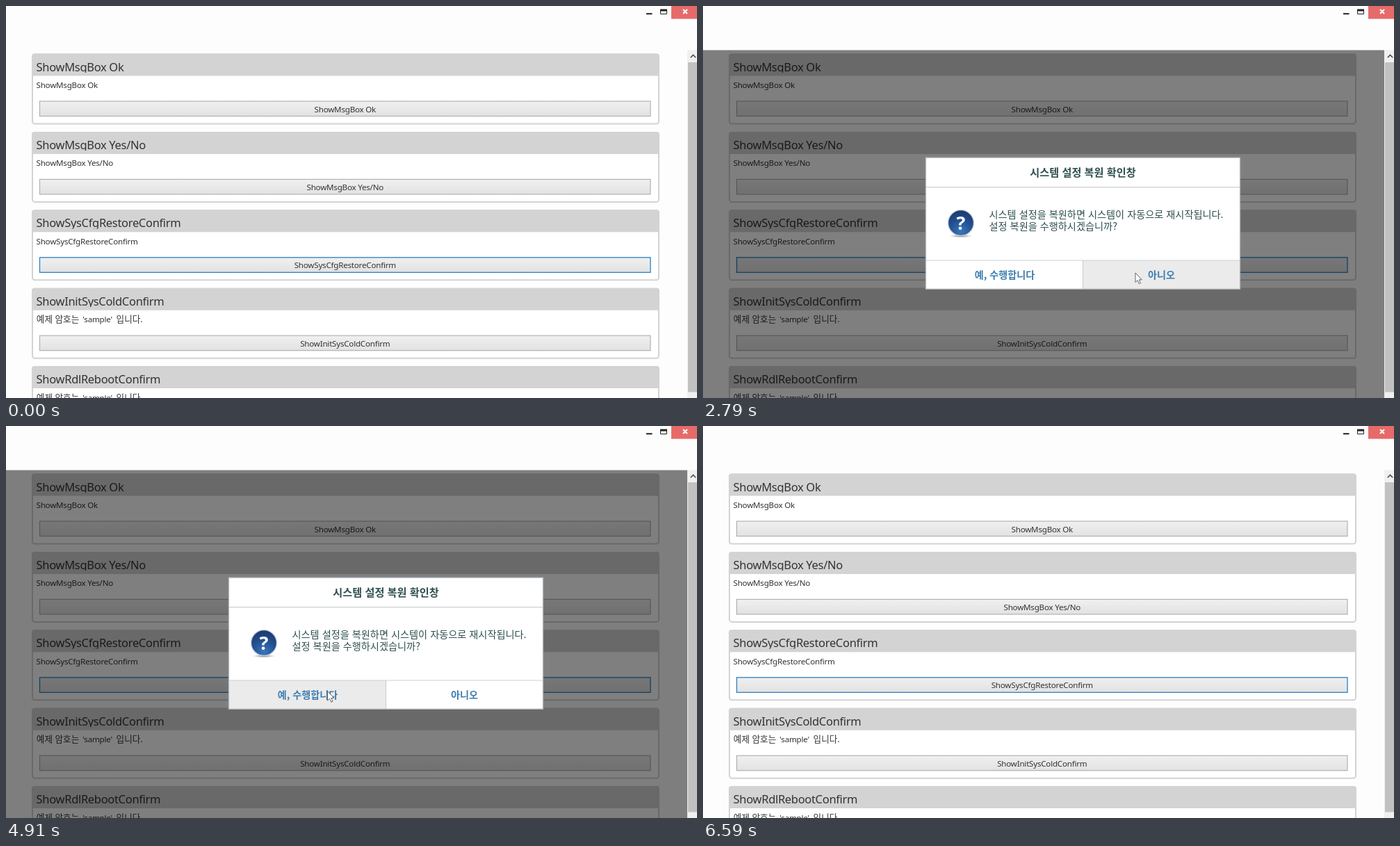
Recreate the animation shown at these times as an HTML page. Size 994 px wide and 564 px high, loop 7.57 s.

```html
<!DOCTYPE html>
<html lang="ko">
<head>
<meta charset="utf-8">
<style>
  html, body { margin: 0; width: 100%; height: 100%; overflow: hidden; background: #fdfdfd; }
  svg { display: block; width: 994px; height: 564px; }
  text { font-family: "Noto Sans", "Noto Sans CJK KR", "Noto Sans CJK JP", sans-serif; white-space: pre; }
  .title { font-size: 16.5px; letter-spacing: -0.32px; fill: #333; }
  .body { font-size: 11.6px; letter-spacing: -0.22px; fill: #333; }
  .ko { font-family: "Noto Sans CJK KR", "Noto Sans CJK JP", sans-serif; }
  .note { font-size: 12.6px; fill: #333; }
  .msg { font-size: 14.2px; fill: #2f4f4f; }
  .head { font-size: 15.2px; font-weight: 700; fill: #2f4f4f; text-anchor: middle; }
  .cmd { font-size: 14.1px; font-weight: 700; fill: #3d7daf; text-anchor: middle; }
  .mid { text-anchor: middle; }
</style>
</head>
<body>
<svg id="stage" viewBox="0 0 994 564">
  <defs>
    <linearGradient id="plain" x2="0" y2="1">
      <stop stop-color="#f0f0f0"/><stop offset="1" stop-color="#e2e2e2"/>
    </linearGradient>
    <linearGradient id="hot" x2="0" y2="1">
      <stop stop-color="#deeefc"/><stop offset="1" stop-color="#c0dff8"/>
    </linearGradient>
    <radialGradient id="ball" cx=".5" cy=".85" r=".85">
      <stop stop-color="#3a76b8"/><stop offset=".55" stop-color="#234f90"/><stop offset="1" stop-color="#1d3768"/>
    </radialGradient>
    <radialGradient id="shade">
      <stop stop-color="#555" stop-opacity=".75"/><stop offset="1" stop-color="#888" stop-opacity="0"/>
    </radialGradient>
    <linearGradient id="leaf" x2="0" y2="1">
      <stop stop-color="#069a0c"/><stop offset="1" stop-color="#08b80a"/>
    </linearGradient>
  </defs>

  <rect width="994" height="564" fill="#fdfdfd"/>
  <g id="cards"></g>
  <rect id="veil" y="63.5" width="980" height="501" fill="#000" opacity=".5"/>

  <g id="scrollbar">
    <rect x="980" y="63.5" width="14" height="501" fill="#f0f0f0"/>
    <rect x="981" y="81" width="13" height="474.5" fill="#c1c1c1"/>
    <path d="M984.8 74.2 988.5 70.4 992.2 74.2" fill="none" stroke="#505050" stroke-width="1.6"/>
  </g>

  <g id="caption">
    <path d="M921 10.2h8.5v2h-8.5z" fill="#222"/>
    <path d="M941.5 5.5h9v6h-9z" fill="none" stroke="#222"/>
    <path d="M941 4.5h10v3h-10z" fill="#222"/>
    <rect x="957" width="37" height="18.5" fill="#e76a6a"/>
    <path d="M974 5l6 6M980 5l-6 6" stroke="#fff" stroke-width="2"/>
  </g>

  <g id="ask">
    <rect x="320.5" y="218.2" width="452" height="189" fill="#fff"/>
    <rect id="yes" x="321" y="366" width="225.5" height="41" fill="#ebebeb"/>
    <rect id="no" x="546.5" y="366" width="225.5" height="41" fill="#ebebeb"/>
    <path d="M321 260.7h451M321 366h451M546.5 366v41" stroke="#cdd0d2" stroke-width="1.2"/>
    <rect x="320.5" y="218.2" width="452" height="189" fill="none" stroke="#b3bac0" stroke-width="1.3"/>
    <text class="ko head" x="546.5" y="245.3">시스템 설정 복원 확인창</text>
    <ellipse cx="371" cy="331" rx="17" ry="2.6" fill="url(#shade)"/>
    <circle cx="371" cy="312" r="18.4" fill="url(#ball)" stroke="#c3cede" stroke-width="1.3"/>
    <text class="mid" x="371" y="321.8" font-size="27" font-weight="700" fill="#fff">?</text>
    <text class="ko msg" x="411.5" y="304.7">시스템 설정을 복원하면 시스템이 자동으로 재시작됩니다.</text>
    <text class="ko msg" x="411.5" y="322.2">설정 복원을 수행하시겠습니까?</text>
    <text class="ko cmd" x="434" y="392">예, 수행합니다</text>
    <text class="ko cmd" x="659.5" y="392">아니오</text>
  </g>

  <g id="done">
    <rect x="381.5" y="221.5" width="330.5" height="183" fill="#fff"/>
    <rect id="ok" x="382" y="363" width="329.5" height="41" fill="#f3f3f3"/>
    <path d="M382 263.8h330M382 362.7h330" stroke="#cdd2d6" stroke-width="1.2"/>
    <rect x="381.5" y="221.5" width="330.5" height="183" fill="none" stroke="#a9b5bf" stroke-width="1.3"/>
    <text class="ko head" x="546.5" y="248.3" style="fill:#607386">확인창</text>
    <ellipse cx="435" cy="335" rx="22" ry="2.2" fill="url(#shade)"/>
    <path d="M415 312.5 420.5 306.5 431.5 315.8 452 296.5 458 302.5 432 329z" fill="url(#leaf)"/>
    <text class="ko msg" x="480.5" y="317.8">완료</text>
    <text class="ko cmd" x="546.5" y="388.5">확인</text>
  </g>

  <path id="cursor" d="M.5 .5V14L3.6 11.2 5.8 16.2 8 15.2 5.8 10.4H9.8z"
        fill="#fff" stroke="#555" stroke-width=".9" stroke-linejoin="round"/>
</svg>

<script>
const LOOP = 7570, CARD_TOP = 68.5, CARD_STEP = 112.4, FOCUSED = 2;
const $ = id => document.getElementById(id);

const names = ["ShowMsgBox Ok", "ShowMsgBox Yes/No", "ShowSysCfgRestoreConfirm",
  "ShowInitSysColdConfirm", "ShowRdlRebootConfirm"];

const note = `<text class="ko note" x="43.8" y="49.8">예제 암호는</text>
  <text class="body" x="110.3" y="49.5">'sample'</text>
  <text class="ko note" x="158.6" y="49.8">입니다.</text>`;

function card(name, i) {
  const body = i < 3 ? `<text class="body" x="43.5" y="49.6">${name}</text>` : note;
  return `<g transform="translate(0 ${CARD_TOP + i * CARD_STEP})">
    <rect x="38" y="1" width="901" height="100" rx="3.5" fill="#fff" stroke="#d3d3d3" stroke-width="2"/>
    <path d="M37 32V4q0-4 4-4h895q4 0 4 4v28z" fill="#d3d3d3"/>
    <svg x="40" width="880" height="27.2"><text class="title" x="3.6" y="25.2">${name}</text></svg>
    ${body}
    <rect class="btn" x="48.5" y="68.5" width="878.5" height="21.5"/>
    <text class="body mid" x="487.8" y="84">${name}</text>
  </g>`;
}
$("cards").innerHTML = names.map(card).join("");
const buttons = [...document.querySelectorAll(".btn")];

// Pointer tip: time, x, y
const path = [
  [160, 620, 484], [840, 592, 393], [1280, 573, 366], [1470, 580, 366],
  [2260, 580, 366], [2990, 637, 390], [3190, 637, 390], [3420, 634, 387],
  [3830, 600, 371], [4530, 600, 371], [4910, 462, 381], [5040, 462, 381],
  [5450, 528, 382], [5780, 528, 382], [6510, 925, 556], [6590, 925, 556]
];

// Dialogs: element, opens, closes
const shows = [["ask", 1470, 3100], ["ask", 4100, 5040], ["done", 5040, 5780]];

function pointer(t) {
  const k = path.findIndex(p => p[0] > t);
  if (k < 1) return null;
  const [a, b] = [path[k - 1], path[k]];
  const u = (t - a[0]) / (b[0] - a[0]);
  return { x: a[1] + (b[1] - a[1]) * u, y: a[2] + (b[2] - a[2]) * u };
}

const show = (id, on) => $(id).setAttribute("visibility", on ? "inherit" : "hidden");

function pop(id, open, t) {
  show(id, !!open);
  if (!open) return;
  const left = (1 - Math.min(1, (t - open[1]) / 570)) ** 3;
  $(id).setAttribute("opacity", 1 - left);
  $(id).setAttribute("transform",
    `translate(546.5 312.8) scale(${1 - 0.1 * left}) translate(-546.5 -312.8)`);
}

function draw(t) {
  const tip = pointer(t);
  const open = shows.find(s => t >= s[1] && t < s[2]);

  buttons.forEach((b, i) => {
    const top = CARD_TOP + i * CARD_STEP + 68;
    const hot = tip && !open && tip.y >= top && tip.y < top + 22.5 && tip.x < 927;
    const ring = hot || i === FOCUSED;
    b.setAttribute("fill", hot ? "url(#hot)" : "url(#plain)");
    b.setAttribute("stroke", ring ? "#2a82c6" : "#acacac");
    b.setAttribute("stroke-width", ring ? 1.3 : 1.1);
  });

  show("veil", !!open);
  for (const id of ["ask", "done"]) pop(id, open && open[0] === id ? open : null, t);

  const low = tip && tip.y > 367;
  show("yes", low && tip.x < 546.5);
  show("no", low && tip.x >= 546.5);
  show("ok", low);

  show("cursor", !!tip);
  if (tip) $("cursor").setAttribute("transform", `translate(${tip.x} ${tip.y})`);
}

function tick() {
  draw(performance.now() % LOOP);
  requestAnimationFrame(tick);
}
tick();
</script>
</body>
</html>
```
